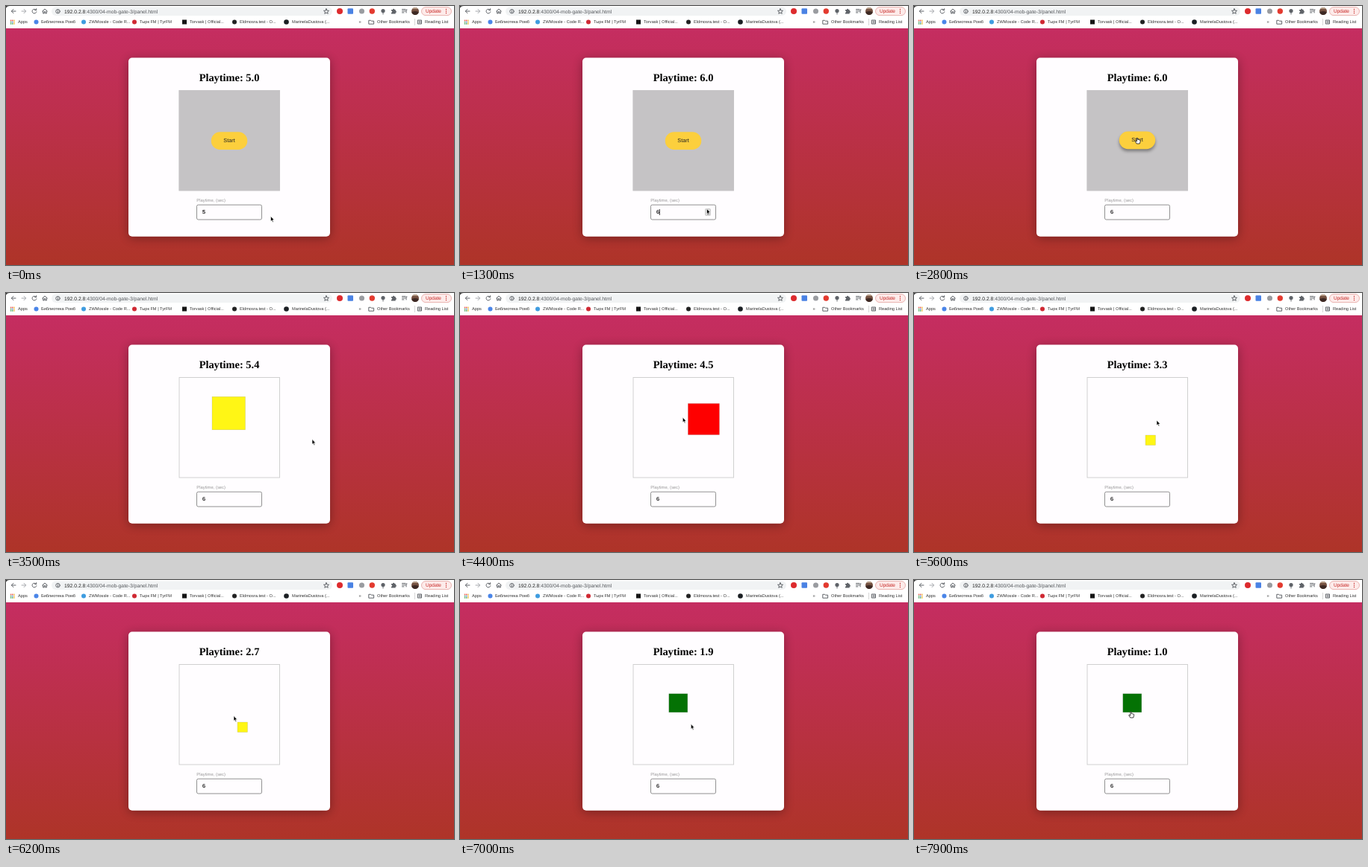
Recreate the animation shown at these times as an HTML page. Size 600 by 348 pixels, loop 8 s.

```html
<!DOCTYPE html>
<html lang="en">
<head>
<meta charset="utf-8">
<title>Playtime</title>
<style>
  html, body { margin: 0; width: 100%; height: 100%; overflow: hidden; background: #fff; }
  svg { display: block; width: 600px; height: 348px; }
  text { font-family: "Liberation Sans", Arial, sans-serif; text-rendering: geometricPrecision; }
  .bar text { font-size: 5.65px; fill: #333; }
  .line { fill: none; stroke: #5f6368; stroke-width: 1; stroke-linecap: round; stroke-linejoin: round; }
  #title { font: bold 14.4px "Liberation Serif", Times, serif; }
</style>
</head>
<body>
<svg viewBox="0 0 600 348">
  <defs>
    <linearGradient id="sky" x2="0" y2="1">
      <stop stop-color="#c52d61"/><stop offset="1" stop-color="#ae3428"/>
    </linearGradient>
    <filter id="soft" x="-20%" y="-20%" width="140%" height="140%"><feGaussianBlur stdDeviation="7"/></filter>
    <filter id="near" x="-30%" y="-60%" width="160%" height="220%"><feGaussianBlur stdDeviation="2"/></filter>
  </defs>

  <!-- browser toolbar -->
  <rect width="600" height="30" fill="#fff"/>
  <path d="M0 0H5Q1 0 0 3Z" fill="#333"/>
  <g class="line">
    <path d="M13 7H7.5M10 4.300L7.300 7L10 9.700"/>
    <path d="M21 7H26.500M24 4.300L26.700 7L24 9.700" stroke="#a5a8ac"/>
    <path d="M40.200 5.200A2.900 2.900 0 1 0 40.800 7.800M40.700 3.600V5.700H38.600"/>
    <path d="M48.700 7L52 4L55.300 7M49.700 6.500V10H51.200V7.700H52.800V10H54.300V6.500"/>
  </g>
  <rect x="61" y="1.500" width="376" height="11.500" rx="5.750" fill="#f1f3f4"/>
  <circle cx="69.500" cy="7.200" r="2.700" class="line" stroke-width=".8"/>
  <path d="M69.500 6.900V8.700M69.500 5.600V5.700" class="line" stroke-width=".8"/>
  <text x="78" y="9.500" font-size="6.800" fill="#222">192.0.2.8<tspan fill="#55585c">:4300/04-mob-gate-3/panel.html</tspan></text>
  <path d="M429 3.700L430 6.100L432.500 6.300L430.600 7.900L431.200 10.300L429 9L426.800 10.300L427.400 7.900L425.500 6.300L428 6.100Z" class="line" stroke-width=".8"/>
  <circle cx="447" cy="7" r="4" fill="#dd2b2e"/>
  <rect x="457.500" y="3.300" width="7.500" height="7.500" rx="1" fill="#4a82e4"/>
  <circle cx="476.500" cy="7" r="3.500" fill="#9a9ca0"/>
  <circle cx="490.300" cy="7" r="3.700" fill="#e33a2f"/>
  <circle cx="505" cy="6.500" r="2.600" fill="#5f6368"/>
  <path d="M505 8V11" class="line"/>
  <path d="M516 5H518A1.200 1.200 0 0 1 520.400 5H521.700V6.600A1.200 1.200 0 0 1 521.700 9V10.500H516V8.800A1.200 1.200 0 0 0 516 6.400Z" fill="#5f6368"/>
  <path d="M530.500 4.500H535M530.500 6.700H535M530.500 8.900H533M536 9V5H537" class="line"/>
  <circle cx="548" cy="7" r="5" fill="#755242"/>
  <path d="M543.200 8.300Q548 5.500 552.800 8.300A5 5 0 0 1 543.200 8.300Z" fill="#3d2924"/>
  <path d="M544 4A5 5 0 0 1 552 4Z" fill="#b9a08a"/>
  <rect x="556.500" y="1.600" width="40" height="11" rx="5.500" fill="#fdebea" stroke="#e5a19d" stroke-width=".8"/>
  <text x="562" y="9.400" font-size="6.500" fill="#c5221f">Update</text>
  <g fill="#c5221f"><circle cx="589.500" cy="4.500" r=".7"/><circle cx="589.500" cy="7" r=".7"/><circle cx="589.500" cy="9.500" r=".7"/></g>

  <!-- bookmarks -->
  <g class="bar">
    <g id="grid"></g>
    <text x="16" y="23.400">Apps</text>
    <circle cx="40.500" cy="21.500" r="3" fill="#4a85e8"/>
    <text x="47" y="23.400">Библиотека Ромб</text>
    <circle cx="104" cy="21.500" r="3" fill="#3f9de0"/>
    <text x="111" y="23.400">ZWMossle - Code R...</text>
    <circle cx="172" cy="21.500" r="3" fill="#cf2933"/>
    <text x="179" y="23.400">Тырк FM | TyrFM</text>
    <rect x="236" y="18.500" width="6" height="6" fill="#151515"/>
    <text x="246" y="23.400">Torvask | Official...</text>
    <circle cx="306" cy="21.500" r="3" fill="#222"/>
    <text x="313" y="23.400">Eldmosra.test - O...</text>
    <circle cx="375.500" cy="21.500" r="3.300" fill="#1b1f23"/>
    <text x="383" y="23.400">MarinelaDustova (...</text>
    <text x="472.500" y="23.300">»</text>
    <path d="M486.200 19.300H488.500L489.300 20.200H492.600V24.200H486.200Z" class="line" stroke-width=".8"/>
    <text x="497" y="23.400">Other Bookmarks</text>
    <path d="M547.500 17V26" stroke="#ccc" stroke-width=".8"/>
    <path d="M551.700 19H556.500V24H551.700ZM553 20.700H555.200M553 22.300H555.200" class="line" stroke-width=".8"/>
    <text x="561" y="23.400">Reading List</text>
  </g>

  <!-- page -->
  <rect y="30" width="600" height="318" fill="url(#sky)"/>
  <rect x="164" y="72" width="270" height="240" rx="5" opacity=".32" filter="url(#soft)"/>
  <rect x="164" y="69.500" width="270" height="240.300" rx="5" fill="#fffdff"/>
  <text id="title" x="299" y="101" text-anchor="middle"></text>
  <rect x="232" y="113.500" width="134.500" height="134.500" fill="none" stroke="#ccc" stroke-width=".9"/>
  <g id="cover">
    <rect x="231.600" y="113.200" width="135.200" height="135" fill="#c5c3c5"/>
    <rect id="glow" x="275" y="172" width="48" height="23" rx="11.500" opacity=".4" filter="url(#near)"/>
    <g id="button">
      <rect x="274.800" y="169.300" width="48.400" height="23.700" rx="11.850" fill="#fccf3d"/>
      <text x="299" y="183.200" font-size="7.300" text-anchor="middle" fill="#222">Start</text>
    </g>
  </g>
  <rect id="box" stroke="#777" stroke-opacity=".35" stroke-width=".5"/>
  <text x="255.300" y="263.300" font-size="5.850" fill="#999">Playtime, (sec)</text>
  <rect x="255.500" y="267.200" width="87" height="19.800" rx="2" fill="#fffdff" stroke="#858585" stroke-width=".9"/>
  <text id="value" x="263" y="279.400" font-size="7.200" stroke="#000" stroke-width=".15"></text>
  <path id="caret" d="M267.300 273V281" stroke="#000" stroke-width=".8"/>
  <g id="spin">
    <rect x="328.500" y="272.500" width="7" height="9" rx="1" fill="#ddd" stroke="#aaa" stroke-width=".5"/>
    <path d="M330.500 276L332 274L333.500 276ZM330.500 278.500L332 280.500L333.500 278.500Z" fill="#444"/>
  </g>

  <!-- pointers, tip at the origin -->
  <path id="arrow" d="M0 0V6.800L1.500 5.500L2.600 8L3.700 7.500L2.600 5.100H4.700Z" stroke="#fff" stroke-width=".6"/>
  <path id="hand" d="M-.700 .6Q0 -.4 .7 .6V2.600Q1.500 2 2 2.800Q2.800 2.300 3.200 3.100Q4 3 4 3.900V5.500L3.200 8H-.8L-2.800 4.900Q-2.700 3.700 -1.600 4.400L-.7 5.200Z" fill="#fff" stroke="#111" stroke-width=".8"/>
</svg>
<script>
const $ = id => document.getElementById(id);
const show = (id, on) => $(id).style.display = on ? "" : "none";
const LOOP = 8000, START = 2900;

// time, x, y of the pointer tip
const path = [
  [0, 354.5, 282.5], [300, 354.5, 282.5], [900, 330.5, 272.5], [1900, 330.5, 272.5],
  [2600, 299, 177], [2900, 299, 177], [3400, 410, 196.500], [3600, 410, 196.500],
  [4100, 299, 165], [4300, 299, 165], [5000, 286, 202], [5400, 325, 171],
  [5600, 325, 171], [6200, 305, 182.500], [6500, 316, 197], [6700, 316, 197],
  [7400, 299, 188], [7900, 290.500, 177], [8000, 290.500, 177]
];
// time shown, x, y, side, colour
const boxes = [
  [2900, 276, 139.300, 44.500, "#fff615"], [4300, 305.400, 148.500, 42, "#fe0000"],
  [5600, 310, 191, 13.500, "#fff615"], [6700, 279.800, 152.800, 25, "#047204"]
];

const dots = ["#e34b3f", "#e34b3f", "#f0b72f", "#43a25a", "#4a84e8", "#f0b72f", "#43a25a", "#43a25a", "#f0b72f"];
$("grid").innerHTML = dots.map((c, i) =>
  `<rect x="${5.800 + i % 3 * 2.200}" y="${18.700 + (i / 3 | 0) * 2.200}" width="1.500" height="1.500" fill="${c}"/>`).join("");

function pointer(t) {
  const i = path.findIndex(p => p[0] > t);
  const [a, x, y] = path[i - 1], [b, u, v] = path[i];
  const k = (t - a) / (b - a), e = k * k * (3 - 2 * k);
  return [x + (u - x) * e, y + (v - y) * e];
}

const inside = (px, py, x, y, w, h) => px >= x && px <= x + w && py >= y && py <= y + h;

function draw(t) {
  const [px, py] = pointer(t);
  const playing = t >= START, sec = t < 1100 ? 5 : 6;
  $("title").textContent = "Playtime: " + (playing ? (8900 - t) / 1000 : sec).toFixed(1);
  $("value").textContent = sec;
  show("caret", t >= 1100 && t < 2800 && (t - 1100) % 1000 < 500);
  show("spin", inside(px, py, 255, 267, 88, 20));

  const overButton = !playing && inside(px, py, 275, 169, 48, 24);
  show("cover", !playing);
  show("glow", overButton);
  $("button").setAttribute("transform", `translate(0 ${overButton ? -0.8 : 0})`);

  const box = boxes.filter(b => b[0] <= t).pop();
  show("box", box);
  let overBox = false;
  if (box) {
    const [, x, y, side, fill] = box;
    Object.entries({ x, y, width: side, height: side, fill }).forEach(([k, v]) => $("box").setAttribute(k, v));
    overBox = inside(px, py, x, y, side, side);
  }

  const hand = overButton || overBox;
  show("hand", hand);
  show("arrow", !hand);
  $(hand ? "hand" : "arrow").setAttribute("transform", `translate(${px} ${py})`);
}

function tick() {
  draw(Math.floor(performance.now() % LOOP / 100) * 100);
  requestAnimationFrame(tick);
}
tick();
</script>
</body>
</html>
```
